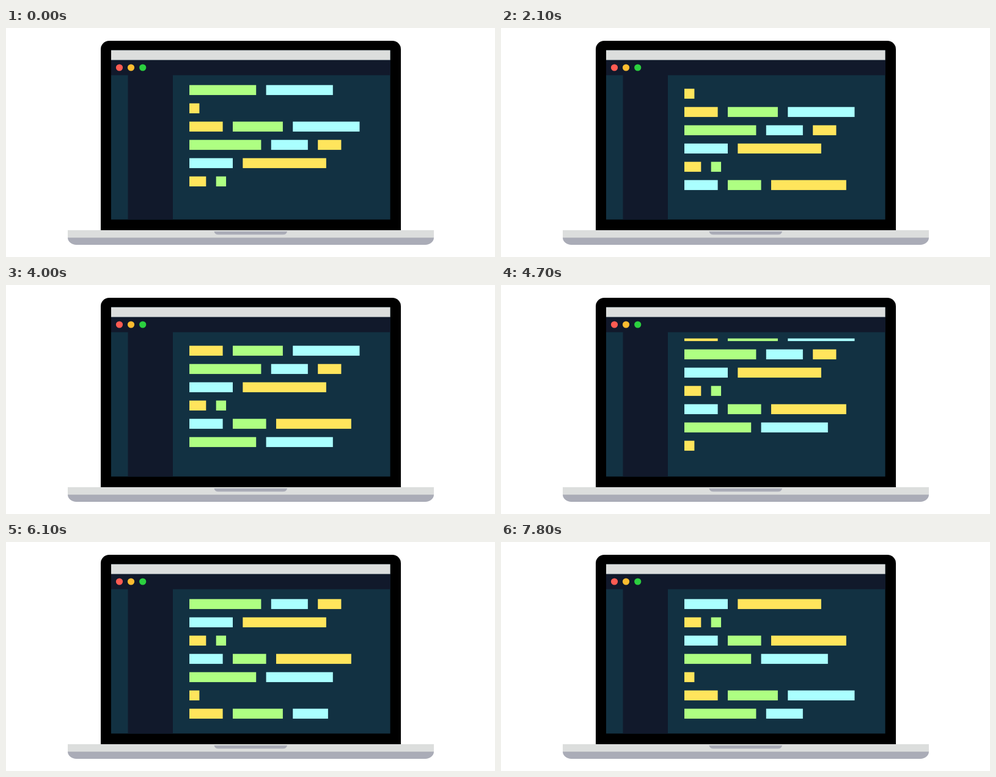
An HTML page for the animation above (8 s loop, 800 by 376 pixels).

```html
<!DOCTYPE html>
<html lang="en">
<head>
<meta charset="utf-8">
<title>Laptop typing code</title>
<style>
  html, body { margin: 0; width: 100%; height: 100%; overflow: hidden; background: #fff; }
  svg { display: block; width: 800px; height: 376px; }
</style>
</head>
<body>
<svg viewBox="0 0 800 376">
  <clipPath id="view"><rect x="273" y="87.8" width="356" height="227"/></clipPath>
  <path d="M155 332V35A14 14 0 0 1 169 21H632A14 14 0 0 1 646 35V332Z"/>
  <rect x="172" y="36.5" width="456.6" height="278" fill="#123142"/>
  <rect x="172" y="36.5" width="456.6" height="16.2" fill="#dcdedd"/>
  <path d="M172 52.7H628.6V77.5H273V314.5H199.5V77.5H172Z" fill="#11192b"/>
  <circle cx="185.5" cy="65" r="5.6" fill="#ff5b52"/>
  <circle cx="204.5" cy="65" r="5.6" fill="#fdbc30"/>
  <circle cx="223.7" cy="65" r="5.6" fill="#2bd03f"/>
  <path d="M101 332H700V345H101Z" fill="#dcdedd"/>
  <path d="M101 344.3H700A14 12 0 0 1 686 356H115A14 12 0 0 1 101 344.3Z" fill="#aaacb7"/>
  <path d="M340.5 334H460Q459 339.3 453 339.3H347.5Q341.5 339.3 340.5 334Z" fill="#aaacb7"/>
  <g clip-path="url(#view)"><g id="code"></g></g>
</svg>
<script>
const LOOP = 8000, TICK = 100;
const LEFT = 300, TOP = 93.7, PITCH = 30;
const UNIT = 5.46, GAP = 3 * UNIT;
const MS_PER_PX = 3.4, PAUSE = 180, SCROLL = 500;
const COLORS = { g: '#aeff82', c: '#aaffff', y: '#ffe55c' };

// Colour and length in units of each bar; the lines repeat
const LINES = ['g20 c20', 'y3', 'y10 g15 c20', 'g21.5 c11 y7', 'c13 y25', 'y5 g3', 'c10 g10 y22.5'];
const READY = 6; // lines already written at the start

// When each new line begins; the code scrolls up just before it
const TYPED = [
  { start: 285 },
  { start: 2190, pause: 330 },
  { start: 4100 },
  { start: 4900 },
  { start: 6825 }
];

const code = document.getElementById('code');
const clamp = v => Math.min(1, Math.max(0, v));
const bars = [];

function addLine(row, start, pause = PAUSE) {
  let x = LEFT, time = start + PAUSE;
  for (const word of LINES[row % LINES.length].split(' ')) {
    const width = word.slice(1) * UNIT;
    const el = document.createElementNS('http://www.w3.org/2000/svg', 'rect');
    const attrs = { x, y: TOP + row * PITCH, height: GAP, fill: COLORS[word[0]] };
    for (const key in attrs) el.setAttribute(key, attrs[key]);
    code.append(el);
    bars.push({ el, width, time });
    x += width + GAP;
    time += width * MS_PER_PX + pause;
  }
}

for (let row = 0; row < READY; row++) addLine(row, -LOOP);
TYPED.forEach(({ start, pause }, i) => addLine(READY + i, start, pause));

function draw(ms) {
  const t = Math.floor(ms % LOOP / TICK) * TICK;
  const steps = TYPED.slice(1).reduce(
    (sum, { start }) => sum + Math.round(5 * clamp((t - start) / SCROLL + 1)), 0);
  code.setAttribute('transform', `translate(0 ${-steps * PITCH / 5})`);
  for (const { el, width, time } of bars) {
    el.setAttribute('width', width * clamp((t - time) / (width * MS_PER_PX)));
  }
}

const begin = performance.now();
function loop() {
  draw(performance.now() - begin);
  requestAnimationFrame(loop);
}
loop();
</script>
</body>
</html>
```
